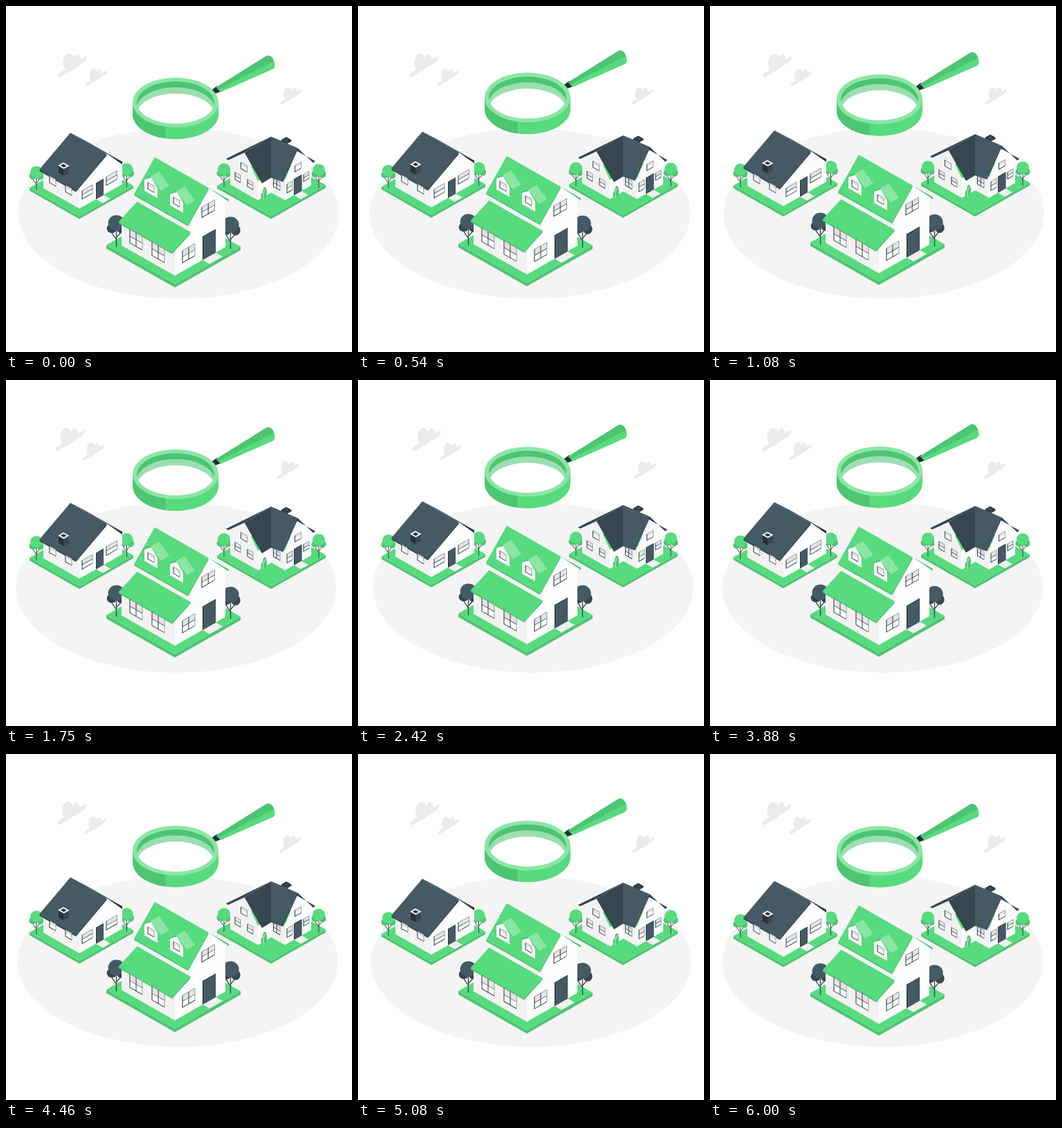
Animation, 500 px wide and 500 px high, one loop 6040 ms. Source, as an HTML page:

```html
<!DOCTYPE html>
<html lang="en">
<head>
<meta charset="utf-8">
<title>House search</title>
<style>
html, body { margin: 0; width: 100%; height: 100%; overflow: hidden; background: #fff; }
svg { display: block; width: 100%; height: 100%; }
</style>
</head>
<body>
<svg id="stage" viewBox="0 0 500 500"></svg>
<script>
const GREEN = '#57db7e', SHADE = '#4dc572', LIGHT = '#8be6a5';
const SLATE = '#455a64', DARK = '#37474f', INK = '#263238';
const LEFT_WALL = '#f2f2f2', RIGHT_WALL = '#fdfdfd', GREY = '#e4e4e4', STONE = '#f0f0f0';
const K = .57; // slope of the isometric axes

const face = (fill, ...points) =>
  `<polygon fill="${fill}" points="${points.map(p => p.map(n => n.toFixed(2))).join(' ')}"/>`;
const path = (fill, d) => `<path fill="${fill}" d="${d}"/>`;
const line = (d, color = DARK, width = 1) =>
  `<path fill="none" stroke="${color}" stroke-width="${width}" d="${d}"/>`;
const oval = (fill, x, y, rx, ry = rx, more = '') =>
  `<ellipse fill="${fill}" cx="${x}" cy="${y}" rx="${rx}" ry="${ry}" ${more}/>`;
const place = (x, y, scale, inner) => `<g transform="translate(${x} ${y}) scale(${scale})">${inner}</g>`;

// A space maps (a: up-left, b: up-right, z: height) to the stage; turn swaps a and b.
const iso = (x, y) => (a, b, z = 0) => [x - a + b, y - K * (a + b) - z];
const turn = P => (a, b, z) => P(b, a, z);

// Upright shapes on the plane a = 0, as [b, z] points
const wall = (P, fill, ...profile) => face(fill, ...profile.map(([d, z]) => P(0, d, z)));
const rect = (P, fill, d, z, w, h) => wall(P, fill, [d, z], [d + w, z], [d + w, z - h], [d, z - h]);

const flat = (P, fill, a, b, w, d, z = 0) =>
  face(fill, P(a, b, z), P(a + w, b, z), P(a + w, b + d, z), P(a, b + d, z));
const block = (P, w, d, h, left, right, top) =>
  rect(turn(P), left, 0, h, w, h) + rect(P, right, 0, h, d, h) + flat(P, top, 0, 0, w, d, h);

// Roof plane running along a, between two [b, z] edges
const slope = (P, fill, a, length, [b1, z1], [b2, z2]) =>
  face(fill, P(a, b1, z1), P(a + length, b1, z1), P(a + length, b2, z2), P(a, b2, z2));
const roof = (P, fill, edge, a, length, eave, ridge) =>
  slope(P, edge, a, length, [eave[0], eave[1] - 2], [ridge[0], ridge[1] - 2]) +
  slope(P, fill, a, length, eave, ridge);
const barge = (P, fill, a, [b1, z1], [b2, z2], depth) =>
  face(fill, P(a, b1, z1), P(a, b2, z2), P(a, b2, z2 - depth));

// d and z give the top left corner
function pane(P, d, z, w, h, bars = '') {
  const [x, y] = P(0, d, z);
  const k = P(0, 1, 0)[0] > P(0, 0, 0)[0] ? -K : K;
  return `<g transform="matrix(1 ${k} 0 1 ${x} ${y})">` +
    `<rect width="${w}" height="${h}" fill="#fff"/><rect width="${w}" height="${h * .45}" fill="${GREY}"/>` +
    line(`M0 0H${w}V${h}`, '#7d888d', .7) +
    (bars.includes('v') ? line(`M${w / 2} 0V${h}`, DARK, 1.1) : '') +
    (bars.includes('h') ? line(`M0 ${h / 2}H${w}`, DARK, .9) : '') +
    line(`M0 0V${h}H${w}`, DARK, 1.1) + '</g>';
}
const door = (P, d, z, w) => rect(P, INK, d, z, w, z) + rect(P, SLATE, d + 1, z - 1, w - 1.4, z - 1);
const step = (P, d, w) => flat(P, STONE, -10, d, 10, w);

const lawn = (x, y, w, d, h) => block(iso(x, y), w, d, h, SHADE, SHADE, GREEN);

const tree = (x, y, scale, main, shade) => place(x, y, scale,
  line('M0 3V25M0 17L-5 10M0 15L5 9') +
  oval(shade, -5, 5, 5.5, 5) + oval(shade, 5.5, 5, 5, 5.5) + oval(main, 0, -1, 9, 8.5));

function leftHouse() {
  const P = iso(106, 293), L = turn(P), stack = iso(83.5, 246);
  const eave = [-8, 32.5], ridge = [37, 60], far = [59, 36];
  return lawn(106, 308, 72, 78, 4) +
    tree(44, 241, 1, GREEN, SHADE) + tree(174.5, 237, 1, GREEN, SHADE) + step(P, 24, 11) +
    rect(L, LEFT_WALL, 0, 31, 52, 31) + rect(L, GREY, 0, 31, 52, 5) +
    slope(P, DARK, -3, 53, ridge, far) +
    wall(P, RIGHT_WALL, [0, 0], [0, 31], [40, 56], [62, 31], [62, 0]) +
    barge(P, INK, -3, ridge, far, 4) + roof(P, SLATE, DARK, -3, 53, eave, ridge) +
    block(stack, 7.5, 7, 10, INK, DARK, INK) +
    flat(stack, STONE, -.5, -.5, 8.5, 8, 11) + flat(stack, INK, 1.5, 1.5, 4.5, 4, 11) +
    pane(L, 43, 22.5, 9, 9.5) + pane(L, 20, 22.5, 9, 9.5) +
    pane(P, 4, 24, 15, 12.5, 'h') + pane(P, 39, 24, 15.5, 12.5, 'h') + door(P, 24, 23.5, 11);
}

function rightHouse() {
  const wing = iso(364, 281), L = turn(wing), P = iso(403, 281), stack = iso(405, 207);
  const top = [383, 189], valley = [383, 248], leftPeak = [345, 212], rightPeak = [422, 206];
  return lawn(383, 308, 78, 79, 4) +
    tree(315, 237, 1, GREEN, SHADE) + tree(452, 238, 1, GREEN, SHADE) + step(P, 13, 11) +
    block(stack, 6, 6, 8, STONE, '#fff', STONE) +
    block(iso(405, 200), 7.5, 7.5, 2, INK, INK, INK) + flat(iso(405, 200), SLATE, 2, 2, 3.5, 3.5, 2) +
    wall(L, LEFT_WALL, [0, 0], [0, 28], [19, 57], [40, 35], [40, 0]) +
    rect(wing, RIGHT_WALL, 0, 28, 20, 28) +
    rect(turn(P), LEFT_WALL, 0, 30, 20, 30) + rect(turn(P), GREY, 0, 30, 20, 5) +
    wall(P, RIGHT_WALL, [0, 0], [0, 29], [19, 64], [38, 33], [38, 0]) +
    face(DARK, top, leftPeak, [321, 223], [318, 221]) +
    face(DARK, top, [447, 224.5], [444, 227], rightPeak) +
    face(DARK, top, valley, [370, 256], leftPeak) +
    face(SLATE, top, rightPeak, [400, 254], valley) +
    line('M345 212L370 256L383 248L400 254L422 206', INK, .7) +
    pane(L, 24.5, 41, 9, 9) + pane(L, 33, 22, 8, 10.5, 'h') + pane(L, 15, 22, 8, 10.5, 'h') +
    pane(turn(P), 16.5, 22, 9.5, 11.5, 'vh') +
    pane(P, 14.5, 42, 9, 9) + pane(P, 3, 22, 8, 13, 'h') + pane(P, 27, 22, 8, 10, 'h') +
    door(P, 13, 23.5, 11.5) +
    oval(SHADE, 371, 275, 2.5, 5) + oval(SHADE, 374, 270, 3, 8) + line('M372 280Q371 271 374 265', '#fff', .7);
}

function dormer(x, y) {
  const L = turn(iso(x, y)), ridge = [10, 26];
  return wall(L, '#f8f8f8', [0, 0], [0, 14], ridge, [19, 16], [19, 0]) +
    roof(L, GREEN, SHADE, 0, 13, [22, 16], ridge) +
    slope(L, LIGHT, 0, 12, [-5, 14], ridge) + pane(L, 14, 15, 9, 9.5);
}

function frontHouse() {
  const P = iso(244, 390), L = turn(P), upper = turn(iso(...P(0, 23)));
  const ridge = [48, 100], far = [77, 67];
  return lawn(244, 407, 99, 95, 5) +
    tree(159.5, 315, 1.32, SLATE, DARK) + tree(324.5, 317.5, 1.35, SLATE, DARK) + step(P, 40, 19) +
    rect(L, LEFT_WALL, 0, 36, 77, 36) + rect(L, GREY, 0, 36, 77, 7) +
    rect(upper, LEFT_WALL, 0, 68, 77, 20) + rect(upper, GREY, 0, 68, 77, 7) +
    wall(P, RIGHT_WALL, [0, 0], [0, 36], [23, 50], [23, 66], [48, 99], [73, 70], [73, 0]) +
    barge(P, SHADE, -1, ridge, far, 3) +
    roof(P, GREEN, SHADE, -1, 77.5, [-5, 37], [22, 51]) +
    roof(P, GREEN, SHADE, -1, 78, [18, 64], ridge) +
    dormer(219, 278) + dormer(256, 299) +
    [65, 33].map(d => pane(L, d, 30, 18, 19.5, 'vh')).join('') +
    pane(P, 11, 30, 18, 17.5, 'vh') + pane(P, 39, 77, 18.5, 15, 'vh') + door(P, 40, 34, 19);
}

function lens() {
  const hole = (fill, drop) => oval(fill, 245, 140 + drop, 56, 30.5, 'clip-path="url(#hole)"');
  return path(INK, 'M297 122L305 116L311 124L300 128Z') +
    path(GREEN, 'M304 118L375 73.5C383 68 389 79 388.5 87Q388 91 385 92L310 125Z') +
    path(SHADE, 'M303.5 118L375 73.5C380 70 385 74 387 80L307 121.5Z') +
    path(GREEN, 'M183 140V157A62 36 0 0 0 307 157V140Z') +
    path(SHADE, 'M183 140V157A62 36 0 0 0 230.5 192V170Z') + oval(LIGHT, 245, 140, 62, 36) +
    `<clipPath id="hole">${oval('#000', 245, 140, 56, 30.5)}</clipPath>` +
    hole(SHADE, 0) + hole('#9bdfb0', 8.5) + hole('#fff', 17.5);
}

const CLOUD = '#ebebeb';
const cloud = (x, y, scale) => place(x, y, scale,
  oval(CLOUD, 17, 13, 8.5, 13) + oval(CLOUD, 29, 9, 5, 8) +
  path(CLOUD, 'M4 27L33 9L41 4Q47 4 38 13L4 34Q-2 32 4 27Z'));

const stage = document.getElementById('stage');
stage.innerHTML =
  `<g id="drift">${oval('#f4f4f4', 249.5, 300, 231.5, 123)}${cloud(74, 69, 1)}${cloud(114, 90.5, .75)}${cloud(395, 117.5, .75)}</g>` +
  `<g id="homes">${leftHouse()}${rightHouse()}${frontHouse()}</g><g id="lens">${lens()}</g>`;

const LOOP = 6040, LEAD = 40;
const SHAKE = [0, -1, 2, -4, 4, -4, 4, -4, 2, -1, 0];
const move = (id, x, y) => document.getElementById(id).setAttribute('transform', `translate(${x} ${y})`);
// Linear rise of 10 and back, n times per loop
const float = (p, n) => -10 * (1 - Math.abs(1 - 2 * (p * n % 1)));

function draw(now) {
  const p = (now + LEAD) % LOOP / LOOP;
  const i = Math.floor(p * 10), part = p * 10 - i;
  move('drift', SHAKE[i] + (SHAKE[i + 1] - SHAKE[i]) * part, 0);
  move('homes', 0, float(p, 1));
  move('lens', 0, float(p, 4));
}

let start;
function tick(now) {
  start ??= now;
  draw(now - start);
  requestAnimationFrame(tick);
}
draw(0);
requestAnimationFrame(tick);
</script>
</body>
</html>
```
